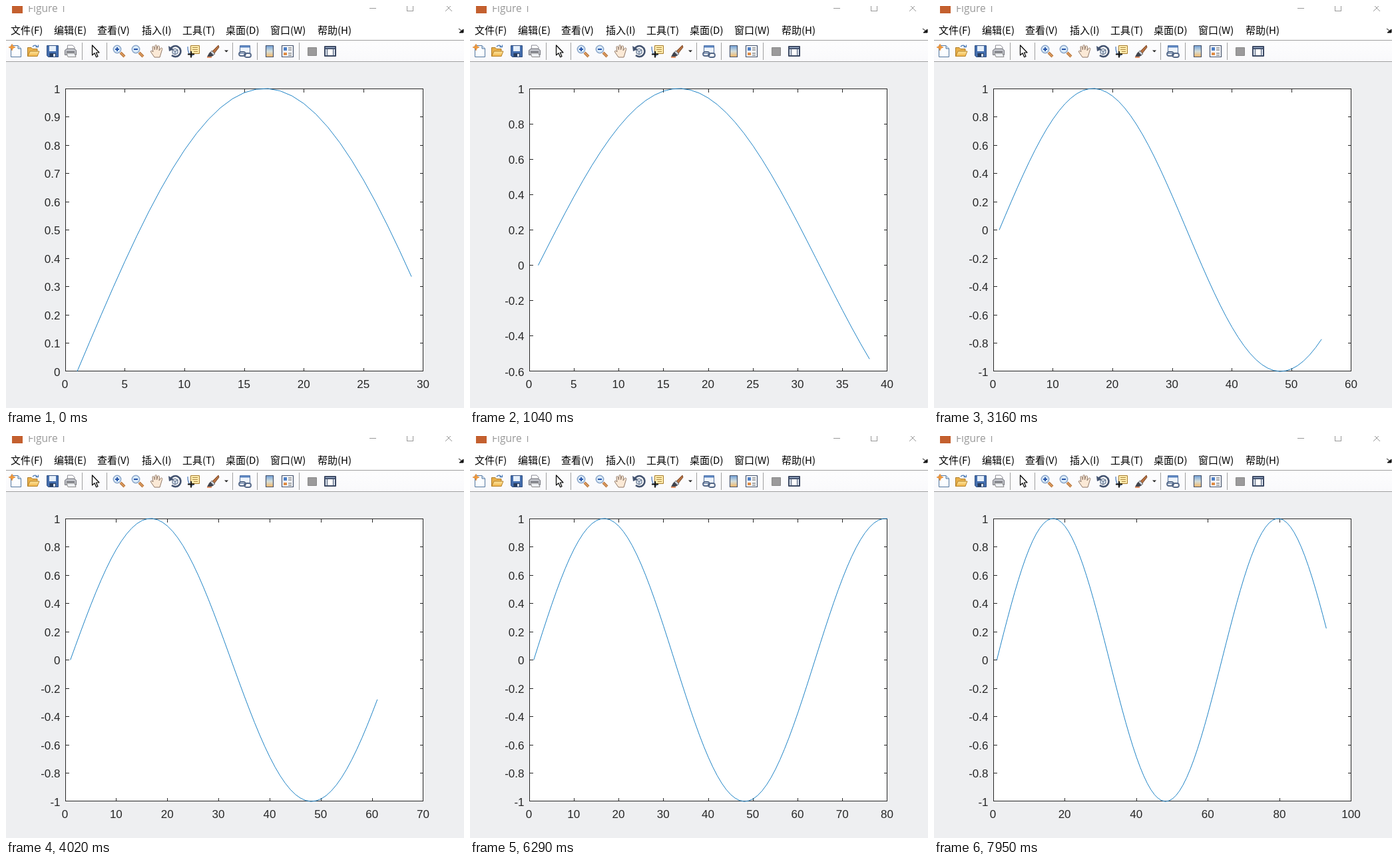
These frames come from a looping animation (688x604 px, 8000 ms). An HTML page:

```html
<!DOCTYPE html>
<html lang="zh">
<head>
<meta charset="utf-8">
<style>
  html, body { margin: 0; width: 100%; height: 100%; overflow: hidden; background: #eeeff1; }
  svg { display: block; }
  .menu { font: 15px "Noto Sans CJK SC", "Noto Sans CJK", sans-serif; fill: #000; }
  .title { font: 15.5px "Open Sans", sans-serif; fill: #999; }
  .axes text { font: 17px "Liberation Sans", Arial, sans-serif; fill: #262626; }
  .crisp { shape-rendering: crispEdges; }
</style>
</head>
<body>
<svg width="688" height="604" viewBox="0 0 688 604">
  <defs>
    <linearGradient id="bar" x2="0" y2="1">
      <stop stop-color="#fdfdfe"/><stop offset="1" stop-color="#f9f9fb"/>
    </linearGradient>
    <linearGradient id="map" x2="0" y2="1">
      <stop stop-color="#6f9fd8"/><stop offset=".5" stop-color="#d5dfdc"/><stop offset="1" stop-color="#f3b765"/>
    </linearGradient>
    <linearGradient id="folder" x2="0" y2="1">
      <stop stop-color="#ffe9a3"/><stop offset="1" stop-color="#efb145"/>
    </linearGradient>
  </defs>
  <rect width="688" height="604" fill="#eeeff1"/>
  <rect width="688" height="52" fill="#fff"/>
  <rect x="9" y="-5" width="16" height="16" fill="#c4602f"/>
  <text class="title" x="33" y="9">Figure 1</text>
  <g fill="none" stroke="#999">
    <path class="crisp" d="M546 3.5h10M602.500 -2.500h9v10h-9z"/>
    <path d="M660 -2l10 10M670 -2l-10 10"/>
  </g>
  <g id="menu" class="menu"></g>
  <path d="M680 34l4 3M687 35v5h-6z" fill="#111" stroke="#111"/>
  <rect y="52" width="688" height="32" fill="url(#bar)"/>
  <path class="crisp" d="M0 51.500h688M0 83.500h688" stroke="#a0a0a0"/>
  <g id="tools" stroke-linejoin="round"></g>
  <rect x="89" y="124" width="538" height="425" fill="#fff"/>
  <g class="axes">
    <path id="ticks" class="crisp" fill="none" stroke="#262626"/>
    <g id="labels"></g>
    <path id="curve" fill="none" stroke="#0072bd" stroke-width=".88" stroke-linejoin="round"/>
  </g>
</svg>
<script>
const el = id => document.getElementById(id);

const menus = [[7, '文件(F)'], [72, '编辑(E)'], [137, '查看(V)'], [204, '插入(I)'],
  [265, '工具(T)'], [330, '桌面(D)'], [397, '窗口(W)'], [468, '帮助(H)']];
el('menu').innerHTML = menus.map(([x, s]) => `<text x="${x}" y="42">${s}</text>`).join('');

const shape = (d, fill = 'none', stroke = 'none', width = 1) =>
  `<path d="${d}" fill="${fill}" stroke="${stroke}" stroke-width="${width}"/>`;

const magnifier = sign =>
  shape('M2 2L8 8', 'none', '#b5733c', 4) + shape('M2 2L8 8', 'none', '#e5a566', 1.5) +
  '<circle cx="-3" cy="-3" r="5.700" fill="#d9eafa" stroke="#8ba6c8" stroke-width="1.500"/>' +
  shape(sign, 'none', '#2754a8', 2);

// Each icon is drawn around its own centre.
const icons = [
  [14, shape('M-6.500 -8.500H4L8.500 -4V8.500H-6.500Z', '#fbfdff', '#53779f') +
       shape('M4 -8.500V-4H8.500', '#cfe0f2', '#53779f') +
       shape('M-5 -11L-3.500 -7.500L0 -6L-3.500 -4.500L-5 -1L-6.500 -4.500L-10 -6L-6.500 -7.500Z', '#f29a3a', '#d77b25', .6)],
  [41, shape('M-8.500 7.500V-5.500H-3L-1 -3.500H6V7.500Z', '#e8b04b', '#ad7a24') +
       shape('M-8.500 7.500L-5 0H9L6 7.500Z', 'url(#folder)', '#b5822b') +
       shape('M-1 -7C2 -10 5 -9 6 -6M3.500 -6.500H7.500V-9.500', 'none', '#4b79b5', 1.3)],
  [70, shape('M-8.500 -8.500H8.500V8.500H-6.500L-8.500 6.500Z', '#456faf', '#2e4d80') +
       shape('M-5 -8H5V0H-5Z', '#e6f0fb') + shape('M-4.500 3H5V8H-4.500Z', '#273c5e') + shape('M1 4H4V8H1Z', '#dbe4f0')],
  [97, shape('M-4.500 -9H3L6 -6V0H-5Z', '#fff', '#8c8c94') +
       shape('M-8.500 -1.500L-5 -4H5L8.500 -1.500V5.500H-8.500Z', '#bfc1c7', '#74757c') +
       shape('M-6 3H6L8 8.500H-4Z', '#eef0f3', '#888') + shape('M-6 1H6', 'none', '#5f6066', 1.5)],
  [134, shape('M-4.500 -9V6L-1 2.800L1.700 8.800L4 7.800L1.400 2H6Z', '#fff', '#000', 1.2)],
  [170, magnifier('M-6 -3H0M-3 -6V0')],
  [198, magnifier('M-6 -3H0')],
  [226, shape('M-3 9L-8.500 1C-9 -1 -7 -1.500 -5 1L-6 -6C-6 -8 -4 -8 -3.500 -6L-2.500 -2L-2 -8C-2 -10 .5 -10 .5 -8V-2L2 -7.500C3 -9 5 -8 4.500 -6L4 -1L6.500 -4.500C8 -6 9.500 -4 8.500 -2.500L5 9Z', '#fbe9d6', '#8f7766')],
  [254, shape('M-7 -3A8 8 0 1 1 -5 6', 'none', '#42526f', 2.6) + shape('M-10 -8L-9 0L-2 -3Z', '#42526f') +
       shape('M-4 -2L0 -4L4 -2V3L0 5L-4 3ZM-4 -2L0 0L4 -2M0 0V5', '#d8e2ef', '#52647f')],
  [282, shape('M-4.500 -8.500H8.500V3.500H-4.500Z', '#ffedb0', '#a67b2a') +
       shape('M-2 -5.500H6M-2 -2.500H6M0 .5H6', 'none', '#a9853e') +
       shape('M-9 -7C-9 0 -8 5 -1 7', 'none', '#5b86c3', 1.3) + shape('M-9 4.500H1M-4 0V9.500', 'none', '#111', 2)],
  [311, shape('M8 -9L-1 0L2 3L9 -6Z', '#b5703f', '#7a4a2e') + shape('M-2 -1L3 4L0 6L-4 2Z', '#cbd0d8', '#777') +
       shape('M-4 1L1 6C-2 9 -6 8 -9 8C-7 6 -7 3 -4 1Z', '#40434c') + shape('M-9 9H-2', 'none', '#db6e34', 1.5)],
  [331, shape('M-3 -1.500H3L0 1.500Z', '#222')],
  [359, shape('M-7.500 -8.500H7.500V3.500H-7.500Z', '#eef4fb', '#52709d') + shape('M-7 -7H7', 'none', '#5c86c2', 3) +
       '<g fill="none" stroke="#526686" stroke-width="1.800"><rect x="-9" y="1" width="10" height="6" rx="3"/><rect x="-1" y="3" width="10" height="6" rx="3"/></g>'],
  [396, shape('M-5.500 -8.500H5.500V8.500H-5.500Z', 'url(#map)', '#46536b', 1.2)],
  [423, shape('M-8.500 -8.500H8.500V8.500H-8.500Z', '#f7f9fc', '#46536b', 1.2) +
       shape('M-6 -6H-1V-1H-6Z', '#4f7fc4') + shape('M-6 2H-1V6H-6Z', '#e08d45') +
       shape('M1 -5H6M1 -2H6M1 3H6M1 6H6', 'none', '#555')],
  [460, shape('M-6.500 -5.500H6.500V6.500H-6.500Z', '#9b9a9b', '#888')],
  [487, shape('M-8.500 -7.500H8.500V7.500H-8.500Z', '#45536e', '#35415a') + shape('M-4 -3H4V6H-4Z', '#fff') +
       shape('M-7 -3H-5V6H-7ZM5 -3H7V6H5Z', '#dfe7f1') + shape('M-7 -5.500H7', 'none', '#a9bddb')]
];
el('tools').innerHTML =
  [114, 151, 340, 377, 440].map(x =>
    `<g class="crisp">${shape(`M${x}.5 55V81`, 'none', '#a0a0a0')}</g>`).join('') +
  icons.map(([x, body]) => `<g transform="translate(${x} 68)">${body}</g>`).join('');

const LOOP = 8000;
// [time, number of plotted samples], linear in between
const pace = [[0, 29], [70, 30], [1040, 38], [1190, 39], [2060, 46], [2210, 47], [2300, 48],
  [3160, 55], [3310, 56], [3460, 57], [4420, 65], [4570, 66], [5120, 70], [5210, 71], [5590, 74],
  [5670, 75], [6290, 80], [6460, 81], [6690, 83], [6760, 84], [7790, 92], [7950, 93], [LOOP, 93]];

function samplesAt(t) {
  const i = pace.findIndex(p => p[0] > t);
  const [t0, n0] = pace[i - 1], [t1, n1] = pace[i];
  return Math.floor(n0 + (n1 - n0) * (t - t0) / (t1 - t0) + 1e-6);
}

const LEFT = 89, RIGHT = 627, TOP = 124, BOTTOM = 549, TICK = 5.5;
// centre of the pixel that holds v, kept inside the axes box
const snap = (v, end) => Math.min(Math.floor(v + 1e-6), end - 1) + .5;
const label = (x, y, anchor, v) =>
  `<text x="${x}" y="${y}" text-anchor="${anchor}">${Math.round(v * 10) / 10 || 0}</text>`;

function plot(n) {
  const values = Array.from({ length: n }, (_, k) => Math.sin(k / 10));
  const yMin = Math.floor(Math.min(...values) * 5) / 5;
  const yStep = yMin < 0 ? 0.2 : 0.1;
  const round = n <= 50 ? 5 : 10;
  const xMax = Math.ceil(n / round) * round;
  const xStep = xMax > 90 ? 20 : xMax >= 50 ? 10 : 5;
  const px = x => LEFT + x / xMax * (RIGHT - LEFT);
  const py = y => BOTTOM - (y - yMin) / (1 - yMin) * (BOTTOM - TOP);

  let ticks = `M${LEFT + .5} ${TOP + .5}H${RIGHT - .5}V${BOTTOM - .5}H${LEFT + .5}Z`;
  let labels = '';
  for (let x = 0; x <= xMax; x += xStep) {
    const p = snap(px(x), RIGHT);
    ticks += `M${p} ${BOTTOM}v${-TICK}M${p} ${TOP}v${TICK}`;
    labels += label(px(x) - .5, 574, 'middle', x);
  }
  const rows = Math.round((1 - yMin) / yStep);
  for (let i = 0; i <= rows; i++) {
    const y = yMin + i * yStep, p = snap(py(y), BOTTOM);
    ticks += `M${LEFT} ${p}h${TICK}M${RIGHT} ${p}h${-TICK}`;
    labels += label(81.5, Math.round(py(y) + 6.5), 'end', y);
  }
  el('ticks').setAttribute('d', ticks);
  el('labels').innerHTML = labels;
  el('curve').setAttribute('d', 'M' + values.map((y, k) =>
    `${px(k + 1).toFixed(2)} ${py(y).toFixed(2)}`).join('L'));
}

let shown = 0;
function frame() {
  const n = samplesAt(performance.now() % LOOP);
  if (n !== shown) plot(shown = n);
  requestAnimationFrame(frame);
}
frame();
</script>
</body>
</html>
```
